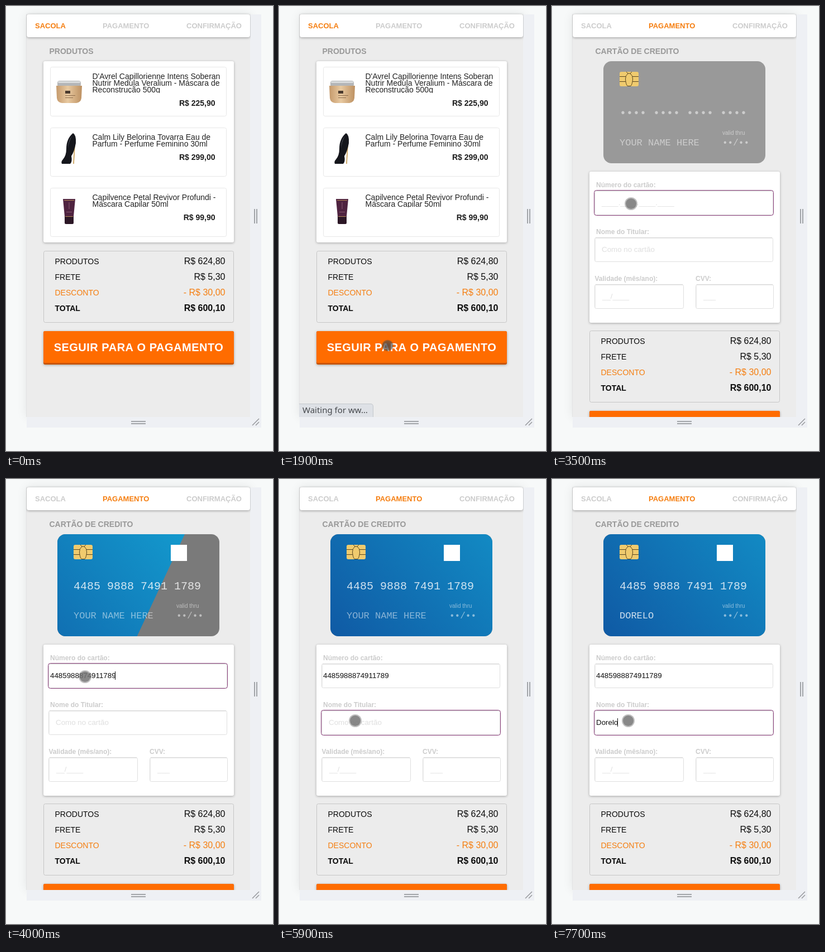
These frames come from a looping animation (478x798 px, 8000 ms). An HTML page with a canvas:

```html
<!DOCTYPE html>
<html lang="pt">
<head>
<meta charset="utf-8">
<title>Checkout</title>
<style>
html, body { margin: 0; width: 100%; height: 100%; overflow: hidden; background: #f7f9f9; }
canvas { display: block; width: 478px; height: 798px; }
</style>
</head>
<body>
<canvas id="stage"></canvas>
<script>
const W = 478, H = 798, LOOP = 8000, STEP = 100;
const SANS = '"Liberation Sans", Arial, sans-serif';
const MONO = '"Liberation Mono", Courier, monospace';
const ORANGE = '#f57e10', MUTED = '#cccccc';
const CARD = { x: 92, y: 99, w: 290, h: 183 };
const NUMBER = '4485988874911789', HOLDER = 'Dorelo';
const PASTE = 3800, TYPED = [6400, 6800, 7000, 7200, 7600, 7700];

const canvas = document.getElementById('stage');
const ctx = canvas.getContext('2d');
const dpr = window.devicePixelRatio || 1;
canvas.width = W * dpr;
canvas.height = H * dpr;

const clamp = v => Math.min(1, Math.max(0, v));
const mix = (a, b, k) => a + (b - a) * k;
const smooth = k => k * k * (3 - 2 * k);

// cubic-bezier(0, 0, .58, 1)
function easeOut(x) {
  let lo = 0, hi = 1;
  for (let i = 0; i < 24; i++) {
    const s = (lo + hi) / 2;
    if (1.74 * s * s * (1 - s) + s ** 3 < x) lo = s; else hi = s;
  }
  return 3 * lo * lo * (1 - lo) + lo ** 3;
}

function text(str, x, y, size, color, { bold, font = SANS, align = 'left', spacing = 0 } = {}) {
  ctx.font = `${bold ? 'bold ' : ''}${size}px ${font}`;
  ctx.textAlign = align;
  ctx.letterSpacing = spacing + 'px';
  ctx.fillStyle = color;
  ctx.fillText(str, x, y);
}

function round(x, y, w, h, r) {
  ctx.beginPath();
  ctx.roundRect(x, y, w, h, r);
}

function fill(x, y, w, h, color, r = 0) {
  round(x, y, w, h, r);
  ctx.fillStyle = color;
  ctx.fill();
}

function frame(x, y, w, h, color, r = 3) {
  round(x + .5, y + .5, w - 1, h - 1, r);
  ctx.strokeStyle = color;
  ctx.lineWidth = 1;
  ctx.stroke();
}

function raised(x, y, w, h, color, r, shadow = 'rgba(0,0,0,.3)', blur = 4, dy = 1) {
  ctx.save();
  ctx.shadowColor = shadow;
  ctx.shadowBlur = blur * dpr;
  ctx.shadowOffsetY = dy * dpr;
  fill(x, y, w, h, color, r);
  ctx.restore();
}

function lines(color, width, ...segs) {
  ctx.beginPath();
  for (const [x1, y1, x2, y2] of segs) {
    ctx.moveTo(x1, y1);
    ctx.lineTo(x2, y2);
  }
  ctx.strokeStyle = color;
  ctx.lineWidth = width;
  ctx.stroke();
}

function shape(path, color) {
  ctx.fillStyle = color;
  ctx.fill(new Path2D(path));
}

function windowFrame() {
  fill(0, 0, W, H, '#f7f9f9');
  raised(37, 15, 400, 722, '#ececec', 0, 'rgba(0,0,0,.09)', 18, 0);
  fill(437, 15, 20, 741, '#eef0f4');
  fill(37, 737, 420, 19, '#eef0f4');
  fill(36, 15, 1, 722, '#e2e3e4');
  lines('#a2a5a9', 2, [224, 745, 250, 745], [224, 749, 250, 749],
    [445, 364, 445, 390], [449, 364, 449, 390]);
  lines('#97999d', 1.5, [441, 752, 453, 740], [447, 752, 453, 746]);
}

function header(page) {
  raised(37, 15, 400, 41, '#ffffff', 4, 'rgba(0,0,0,.35)', 4, 1);
  [['SACOLA', 52], ['PAGAMENTO', 173], ['CONFIRMAÇÃO', 323]].forEach(([label, x], i) =>
    text(label, x, 40, 13, i === page ? ORANGE : MUTED, { bold: true }));
}

function summary(y) {
  frame(67, y, 341, 129, '#c6c6c6');
  const rows = [['PRODUTOS', 'R$ 624,80'], ['FRETE', 'R$ 5,30'],
    ['DESCONTO', '- R$ 30,00'], ['TOTAL', 'R$ 600,10']];
  rows.forEach(([label, value], i) => {
    const color = i === 2 ? ORANGE : '#0c0c0c', bold = i === 3, base = y + 24 + 28 * i;
    text(label, 87.5, base, 14, color, { bold });
    text(value, 392.5, base, 16, color, { bold, align: 'right' });
  });
}

function button(y, label) {
  raised(67, y, 341, 60, '#c95500', 3);
  fill(67, y, 341, 57, '#ff6c00', [3, 3, 2, 2]);
  text(label, 237.5, y + 36, 20, '#ffffff', { bold: true, align: 'center', spacing: .5 });
}

function jar() {
  const g = ctx.createLinearGradient(90, 0, 136, 0);
  g.addColorStop(0, '#c59a6c');
  g.addColorStop(.45, '#e8c9a0');
  g.addColorStop(1, '#bd9162');
  shape('M90 143H136L135 165Q134 173 126 174H100Q92 173 91 165Z', g);
  fill(92, 134, 42, 9, '#b4b6b8', [4, 4, 1, 1]);
  fill(93, 135, 40, 3, '#dadcdd', 2);
  fill(106, 152, 9, 5, '#4a3a2e');
  lines('#8d6c4c', 1, [106, 160.5, 124, 160.5], [106, 164.5, 120, 164.5]);
}

function shoe() {
  lines('#c79a4e', 1.6, [123.5, 240, 121, 283]);
  shape('M120 228Q126 231 125 246Q122 262 117 269Q119 279 115 283H100Q98 279 102 275Q108 268 108 256Q108 238 120 228Z', '#15161c');
  shape('M118 233Q111 242 111 256Q112 244 118 233Z', '#5b5e68');
}

function tube() {
  shape('M102 346H124L121 377H105Z', '#4f2340');
  fill(105, 377, 16, 14, '#2c1726', [0, 0, 2, 2]);
  lines('#b58a58', 1, [104, 348.5, 122, 348.5], [106, 377.5, 120, 377.5]);
  lines('#8a5a72', 1, [113, 352, 113, 364], [108, 369.5, 118, 369.5]);
}

function product(y, h, rows, price, priceY, picture) {
  frame(79, y, 316, h, '#e7e7e7');
  picture();
  const last = y + 22 + 12 * (rows.length - 1);
  ctx.save();
  ctx.beginPath();
  ctx.rect(150, y, 240, last + 1 - y);
  ctx.clip();
  rows.forEach((row, i) => text(row, 154.5, y + 22 + 12 * i, 14, '#222222'));
  ctx.restore();
  text(price, 374.5, priceY, 14, '#1c1c1c', { bold: true, align: 'right' });
}

function bagPage() {
  text('PRODUTOS', 77.5, 86, 14, '#999999', { bold: true });
  raised(67, 99, 341, 325, '#ffffff', 3);
  product(109, 89, ["D'Avrel Capillorienne Intens Soberan", 'Nutrir Medula Veralium - Máscara de',
    'Reconstrução 500g'], 'R$ 225,90', 179, jar);
  product(218, 88, ['Calm Lily Belorina Tovarra Eau de', 'Parfum - Perfume Feminino 30ml'],
    'R$ 299,00', 276, shoe);
  product(326, 88, ['Capilvence Petal Revivor Profundi -', 'Máscara Capilar 50ml'],
    'R$ 99,90', 384, tube);
  summary(439);
  button(583, 'SEGUIR PARA O PAGAMENTO');
}

function chip() {
  fill(121, 118, 34, 26, '#f0cb6e', 3);
  lines('#5a4620', 1, [121, 126.5, 132, 126.5], [121, 135.5, 132, 135.5],
    [144, 126.5, 155, 126.5], [144, 135.5, 155, 135.5]);
  ctx.stroke(new Path2D('M133 118L136 121Q131 125 131.5 131Q132 140 135 143.5M143 118L140 121Q145 125 144.5 131Q144 140 141 143.5M136 121H140M135 143.5H141'));
}

function cardFill(k) {
  const { x, y, w, h } = CARD, a = 25 * Math.PI / 180;
  const bw = w * 1.5, bh = h * 2, left = x + w * mix(-1.7, -.22, k);
  const half = (bw * Math.sin(a) + bh * Math.cos(a)) / 2;
  const gx = Math.sin(a) * half, gy = Math.cos(a) * half;
  ctx.save();
  ctx.translate(left + bw / 2, y - h * .6 + bh / 2);
  ctx.rotate(a);
  const g = ctx.createLinearGradient(-gx, gy, gx, -gy);
  g.addColorStop(0, '#0f509e');
  g.addColorStop(1, '#1399cd');
  ctx.fillStyle = g;
  ctx.fillRect(-bw / 2, -bh / 2, bw, bh);
  ctx.restore();
}

function creditCard(t, name) {
  const { x, y, w, h } = CARD, known = t >= PASTE;
  const soft = 'rgba(255,255,255,.5)', strong = 'rgba(255,255,255,.8)';
  ctx.save();
  round(x, y, w, h, 14.5);
  ctx.clip();
  ctx.fillStyle = known && t < 4400 ? mixGray(clamp((t - PASTE) / 200)) : '#999999';
  ctx.fillRect(x, y, w, h);
  if (known) cardFill(easeOut(clamp((t - 3815) / 500)));
  ctx.restore();
  chip();
  if (known) fill(295, 118, 29, 29, '#ffffff');
  const digits = known ? NUMBER : '•'.repeat(16);
  text(digits.match(/.{4}/g).join(' '), 121, 198, 20, known ? strong : soft, { font: MONO });
  text(name ? name.toUpperCase() : 'YOUR NAME HERE', 121, 250, 17, name ? strong : soft, { font: MONO });
  text('valid thru', 305, 231, 10, soft);
  text('••/••', 305, 250, 16, soft, { font: MONO });
}

// the plain card turns a little darker while the colour slides in
function mixGray(k) {
  const v = Math.round(mix(153, 122, k));
  return `rgb(${v},${v},${v})`;
}

function field(x, y, w, { value, hint, hintX = 89, focus, caret }) {
  fill(x, y, w, 44, '#ffffff', 3);
  frame(x, y, w, 44, '#dedede');
  lines('#d4d4d4', 1, [x + 2, y + .5, x + w - 2, y + .5]);
  lines('#eeeeee', 1, [x + 2, y + 1.5, x + w - 2, y + 1.5], [x + 1.5, y + 2, x + 1.5, y + 42]);
  if (focus) frame(x - 1, y - 1, w + 2, 46, '#8b3f7c', 4);
  if (value) text(value, 79, y + 26, 13.333, '#111111');
  else text(hint, hintX, y + 26, 13.333, '#dfdfdf');
  if (caret) {
    ctx.font = `13.333px ${SANS}`;
    ctx.letterSpacing = '0px';
    fill(Math.floor(79 + ctx.measureText(value).width) - (value ? 1 : 0), y + 14, 1, 15, '#111111');
  }
}

function paymentPage(t) {
  const name = HOLDER.slice(0, TYPED.filter(k => t >= k).length);
  const number = t >= PASTE ? NUMBER : '';
  const lastEdit = Math.max(...[3000, PASTE, 5000, ...TYPED].filter(k => t >= k));
  const blink = (t - lastEdit) % 1000 < 500;
  const onNumber = t >= 3000 && t < 5000, onName = t >= 5000;

  text('CARTÃO DE CREDITO', 77.5, 86, 14, '#999999', { bold: true });
  creditCard(t, name);
  raised(67, 297, 341, 271, '#ffffff', 3);
  [['Número do cartão:', 79, 325], ['Nome do Titular:', 79, 409],
    ['Validade (mês/ano):', 76.5, 493], ['CVV:', 257, 493]].forEach(([label, x, y]) =>
    text(label, x, y, 12, MUTED, { bold: true }));
  field(76, 331, 320, { value: number, hint: '____.____.____.____', focus: onNumber, caret: onNumber && blink });
  field(76, 415, 320, { value: name, hint: 'Como no cartão', focus: onName, caret: onName && blink });
  field(76, 499, 160, { hint: '__/____', hintX: 90 });
  field(257, 499, 140, { hint: '___', hintX: 271 });
  summary(582);
  button(726, 'FINALIZAR PAGAMENTO');
}

function statusBubble() {
  fill(36, 713, 133, 24, '#c3c7cc', [0, 5, 0, 0]);
  fill(36, 714, 132, 23, '#dee1e6', [0, 4, 0, 0]);
  text('Waiting for ww…', 42, 730, 15, '#45484c', { font: '"Noto Sans", "Open Sans", sans-serif' });
}

function pointer(t) {
  if (t < 300) return;
  const path = [[300, 121, 607], [500, 194.5, 609], [2000, 194.5, 609], [2600, 141.5, 354.5],
    [4600, 141.5, 354.5], [4800, 136.5, 433.5], [LOOP, 136.5, 433.5]];
  const i = path.findIndex(p => t < p[0]);
  const [t0, x0, y0] = path[i - 1], [t1, x1, y1] = path[i];
  const k = smooth((t - t0) / (t1 - t0));
  const x = mix(x0, x1, k), y = mix(y0, y1, k);
  const disc = (r, color) => {
    ctx.beginPath();
    ctx.arc(x, y, r, 0, Math.PI * 2);
    ctx.fillStyle = color;
    ctx.fill();
  };
  if (t < 2000) {
    const g = ctx.createRadialGradient(x, y, 2, x, y, 11);
    g.addColorStop(0, 'rgba(70,70,75,.8)');
    g.addColorStop(.75, 'rgba(80,75,72,.65)');
    g.addColorStop(1, 'rgba(110,85,65,0)');
    disc(11, g);
  } else {
    disc(11.5, 'rgba(130,130,130,.5)');
    disc(9.5, 'rgba(112,112,112,.7)');
  }
}

function draw(t) {
  const page = t < 2000 ? 0 : 1;
  ctx.setTransform(dpr, 0, 0, dpr, 0, 0);
  windowFrame();
  ctx.save();
  ctx.beginPath();
  ctx.rect(36, 0, 402, 737);
  ctx.clip();
  if (page) paymentPage(t); else bagPage();
  header(page);
  if (t >= 1800 && t < 2500) statusBubble();
  pointer(t);
  ctx.restore();
}

const start = performance.now();
function tick() {
  const t = (performance.now() - start) % LOOP;
  draw(Math.floor(t / STEP) * STEP);
  requestAnimationFrame(tick);
}
tick();
</script>
</body>
</html>
```
